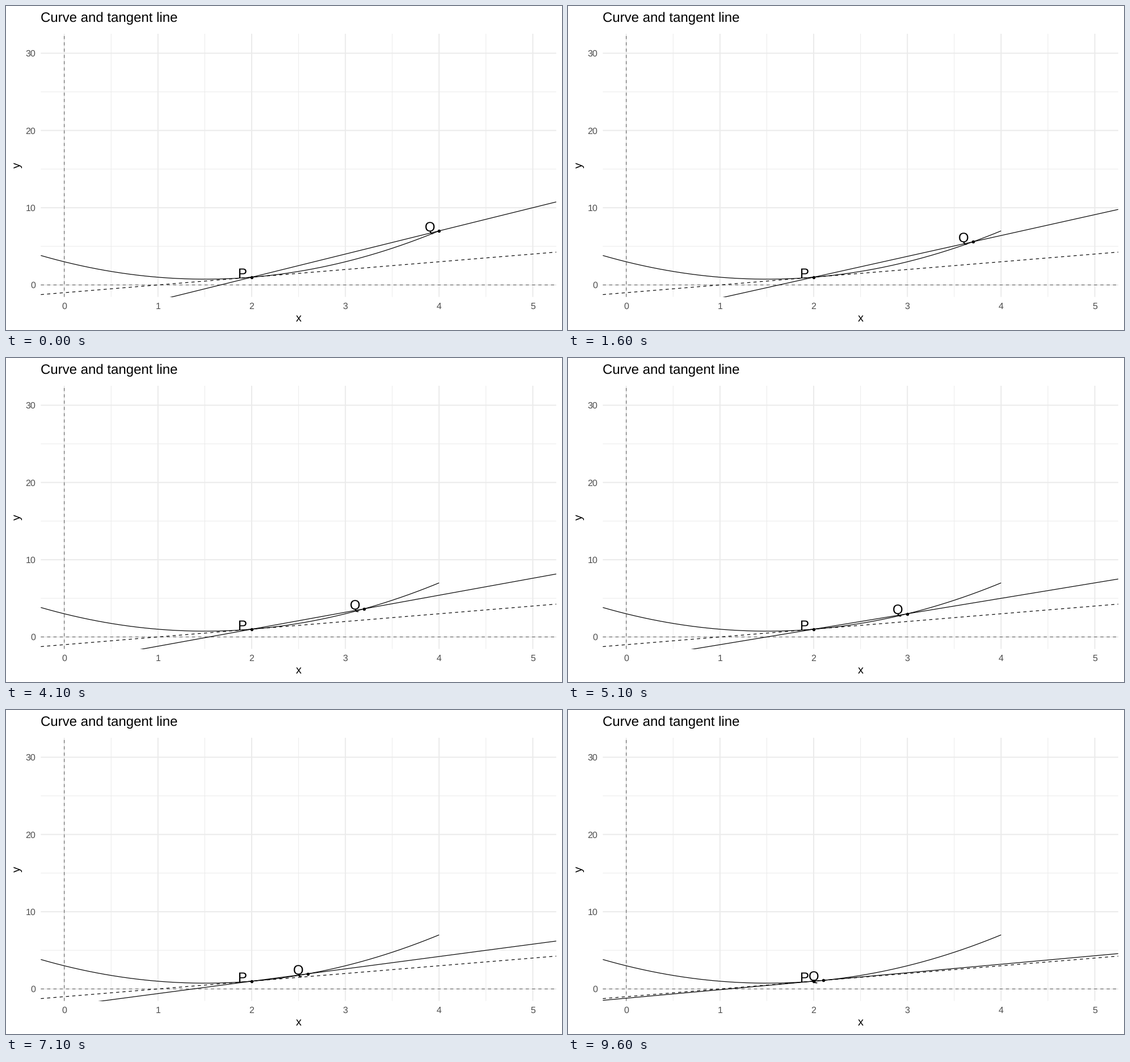
These frames come from a looping animation (980x572 px, 10000 ms). A matplotlib script:

```python
import numpy as np
import matplotlib.pyplot as plt
from matplotlib.animation import FuncAnimation

plt.rcParams.update({
    "font.family": "Liberation Sans",
    "text.hinting": "none",
    "text.hinting_factor": 1,
    "lines.scale_dashes": False,
    "lines.solid_capstyle": "butt",
})

W, H, DPI = 980, 572, 100
LEFT, RIGHT, TOP, BOTTOM = 61.4, 969.8, 48.6, 513.6
XLIM, YLIM = (-0.25, 5.25), (-1.55, 32.55)
FRAMES, INTERVAL = 100, 100
CAP = 0.69  # cap height per em
P_X = 2.0


def pt(px):
    return px * 72 / DPI


def curve(x):
    return x**2 - 3 * x + 3


def to_px(x, y):
    fx = (x - XLIM[0]) / (XLIM[1] - XLIM[0])
    fy = (y - YLIM[0]) / (YLIM[1] - YLIM[0])
    return LEFT + fx * (RIGHT - LEFT), BOTTOM - fy * (BOTTOM - TOP)


fig = plt.figure(figsize=(W / DPI, H / DPI), dpi=DPI, facecolor="white")
ax = fig.add_axes([LEFT / W, 1 - BOTTOM / H, (RIGHT - LEFT) / W, (BOTTOM - TOP) / H])
ax.set(xlim=XLIM, ylim=YLIM)
ax.axis("off")


def line(x, y, width=1.2, color="black", dashed=False, z=3):
    dash = (0, (pt(5.55), pt(5.55))) if dashed else "-"
    return ax.plot(x, y, color=color, lw=pt(width), ls=dash, snap=False, zorder=z)[0]


def label(x, y, text, size, color="black", ha="center", rotation=0):
    """Place text by its baseline, in pixels from the top left."""
    return fig.text(x / W, 1 - y / H, text, size=pt(size), color=color, ha=ha,
                    va="baseline", rotation=rotation, rotation_mode="anchor")


def dot(x, y):
    return ax.plot(x, y, "o", color="black", ms=pt(5.5), mew=0, snap=False, zorder=4)[0]


def name_spot(x, y, size=23.7):
    """Baseline point of a name set up and left of a dot."""
    px, py = to_px(x - 0.1, y + 0.5)
    return px, py + CAP * size / 2


# Grid
GRID = "#EBEBEB"
for x in np.arange(0.5, 5):
    line((x, x), YLIM, 1, GRID, z=1)
for y in (5, 15, 25):
    line(XLIM, (y, y), 1, GRID, z=1)
for x in range(6):
    line((x, x), YLIM, 2, GRID, z=2)
    label(to_px(x, 0)[0], 534.7, str(x), 16.3, "#4D4D4D")
for y in range(0, 31, 10):
    line(XLIM, (y, y), 2, GRID, z=2)
    label(52.2, to_px(0, y)[1] + 5.8, str(y), 16.3, "#4D4D4D", ha="right")

# Zero axes
line((0, 0), YLIM, 1.2, "#6E6E6E", dashed=True)
line(XLIM, (0, 0), 1.2, "#6E6E6E", dashed=True)

# Titles
label(61.4, 28.2, "Curve and tangent line", 24.45, ha="left")
label((LEFT + RIGHT) / 2, 557.4, "x", 20.4)
label(24.3, (TOP + BOTTOM) / 2, "y", 20.4, rotation=90)

# Curve, tangent at P and moving secant
xs = np.linspace(XLIM[0], 4, 200)
line(xs, curve(xs))
ends = np.array(XLIM)
line(ends, ends - 1, dashed=True)
secant = line(ends, ends)
dot([P_X], [curve(P_X)])
q_dot = dot([4], [curve(4)])
label(*name_spot(P_X, curve(P_X)), "P", 23.7)
q_name = label(0, 0, "Q", 23.7)

# Q rests at each step and moves briefly between them
moves = [(2, 5), (8, 11)] + [(5 * k - 1, 5 * k + 1) for k in range(3, 20)]
key_times = np.array(moves).ravel()
key_steps = [s for k in range(len(moves)) for s in (k, k + 1)]


def update(n):
    q = 4 - 0.1 * np.interp(n, key_times, key_steps)
    y = curve(q)
    secant.set_ydata(curve(P_X) + (q - 1) * (ends - P_X))
    q_dot.set_data([q], [y])
    px, py = name_spot(q, y)
    q_name.set_position((px / W, 1 - py / H))
    return secant, q_dot, q_name


anim = FuncAnimation(fig, update, frames=FRAMES, interval=INTERVAL,
                     repeat=True, repeat_delay=0, blit=False)
plt.show()
```
